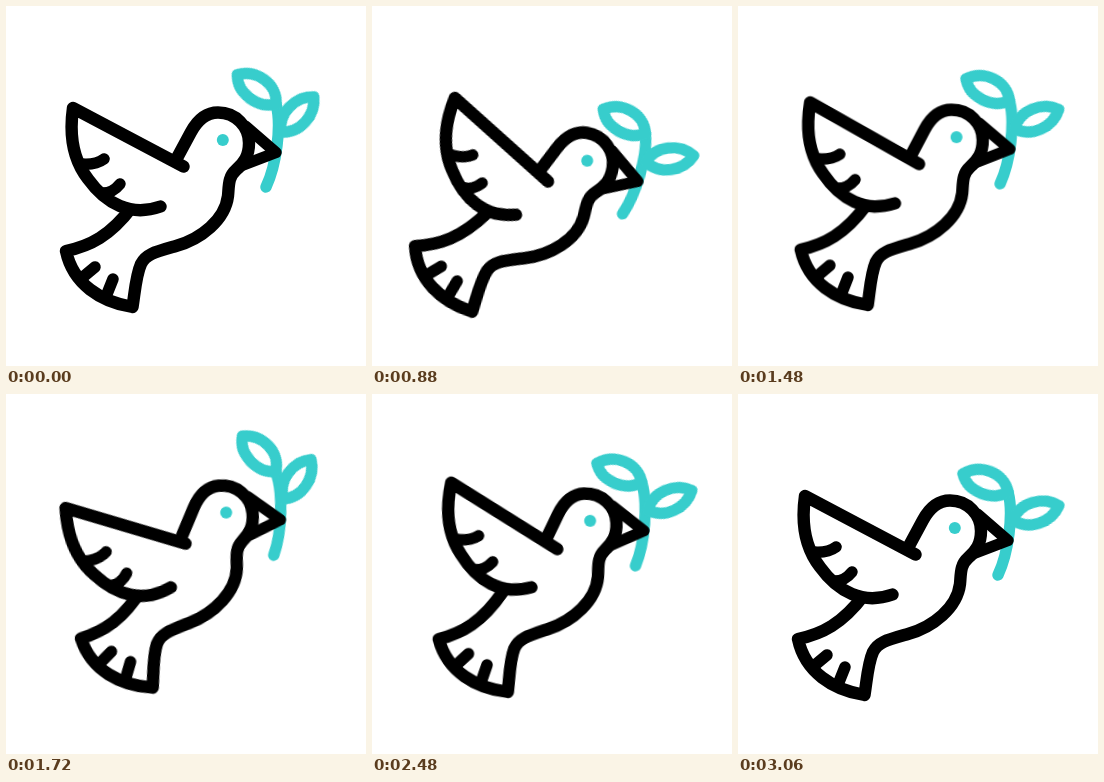
An HTML page for the animation above (3.08 s loop, 360x360 px).

```html
<!DOCTYPE html>
<html lang="en">
<head>
<meta charset="utf-8">
<title>Dove with a twig</title>
<style>
  html, body { margin: 0; width: 100%; height: 100%; overflow: hidden; background: #fff; }
  svg { display: block; width: 100vw; height: 100vh; }
  path { fill: none; stroke: #000; stroke-width: 12.4; stroke-linecap: round; stroke-linejoin: round; }
  .twig path { stroke: #37cdcc; stroke-width: 11.4; }
  .eye { fill: #37cdcc; }
  .beak, .mark { stroke-width: 11.5; }
  .vane { fill: #fff; }

  .bird, .wing, .left, .right { animation: 3080ms linear infinite; }
  .bird { animation-name: sway; transform-origin: 217px 134px; }
  .wing { animation-name: flap; transform-origin: 179px 203px; }
  .left { animation-name: left; }
  .right { animation-name: right; }

  @keyframes sway {
    0%, 4.2% { transform: translate(0, 0) rotate(0deg); }
    31.82% { transform: translate(-1.8px, 23.5px) rotate(10.1deg); }
    61.04% { transform: translate(4.5px, -23.8px) rotate(-9deg); }
    88.96%, 100% { transform: translate(0, 0) rotate(0deg); }
  }
  @keyframes flap {
    0%, 2.6% { transform: rotate(0deg); }
    12.82% { transform: rotate(-14.6deg); }
    36.04% { transform: rotate(14.3deg); }
    64.61% { transform: rotate(-14.6deg); }
    85.71% { transform: rotate(13.8deg); }
    99.35%, 100% { transform: rotate(0deg); }
  }
  /* The leaves start half raised, then beat between low and high. */
  @keyframes left {
    0%, 2.6% { transform: rotate(36deg); }
    10.55%, 28.41%, 46.27%, 64.12%, 81.98%, 99.84%, 100% { transform: rotate(19deg); }
    19.48%, 37.34%, 55.19%, 73.05%, 90.91% { transform: rotate(54deg); }
  }
  @keyframes right {
    0%, 2.6% { transform: rotate(-47deg); }
    10.55%, 28.41%, 46.27%, 64.12%, 81.98%, 99.84%, 100% { transform: rotate(-15.5deg); }
    19.48%, 37.34%, 55.19%, 73.05%, 90.91% { transform: rotate(-52deg); }
  }
</style>
</head>
<body>
<svg viewBox="0 0 360 360">
  <g class="bird">
    <g class="twig">
      <path d="M260 181C270 160 276 120 270 98"/>
      <g transform="translate(270 98)">
        <path class="left" d="M0 0C-10 -17 -36 -17 -48.500 -1C-38 14 -12 15 0 0Z"/>
      </g>
      <g transform="translate(275 126)">
        <path class="right" d="M0 0C12 -15 36 -14 48 0C36 14 12 15 0 0Z"/>
      </g>
    </g>
    <path class="beak" d="M240 120.500L270 146.500L236 159.500"/>
    <path d="M171 152L185 126C191 115 200 106.500 212 106.500C230 106.500 243 121 243 137C243 150 238 157 230 164C222 171 223 180 222 190C219 214 195 233 170 240C149 246 140 248 135 258C130 269 129 285 126.500 301C95 296 67 278 60 245C84 240 104 230 126 201"/>
    <path class="mark" d="M89 261L77 271M107 273L101 288"/>
    <circle class="eye" cx="216.800" cy="134" r="6"/>
    <g class="wing">
      <path class="vane" d="M177.500 160.500L67 102C63 130 68 155 82 173C100 198 125 211 154.500 200.500"/>
      <path class="mark" d="M98 153Q90 159 76 158M114 178Q106 188 95 187"/>
    </g>
  </g>
</svg>
</body>
</html>
```
